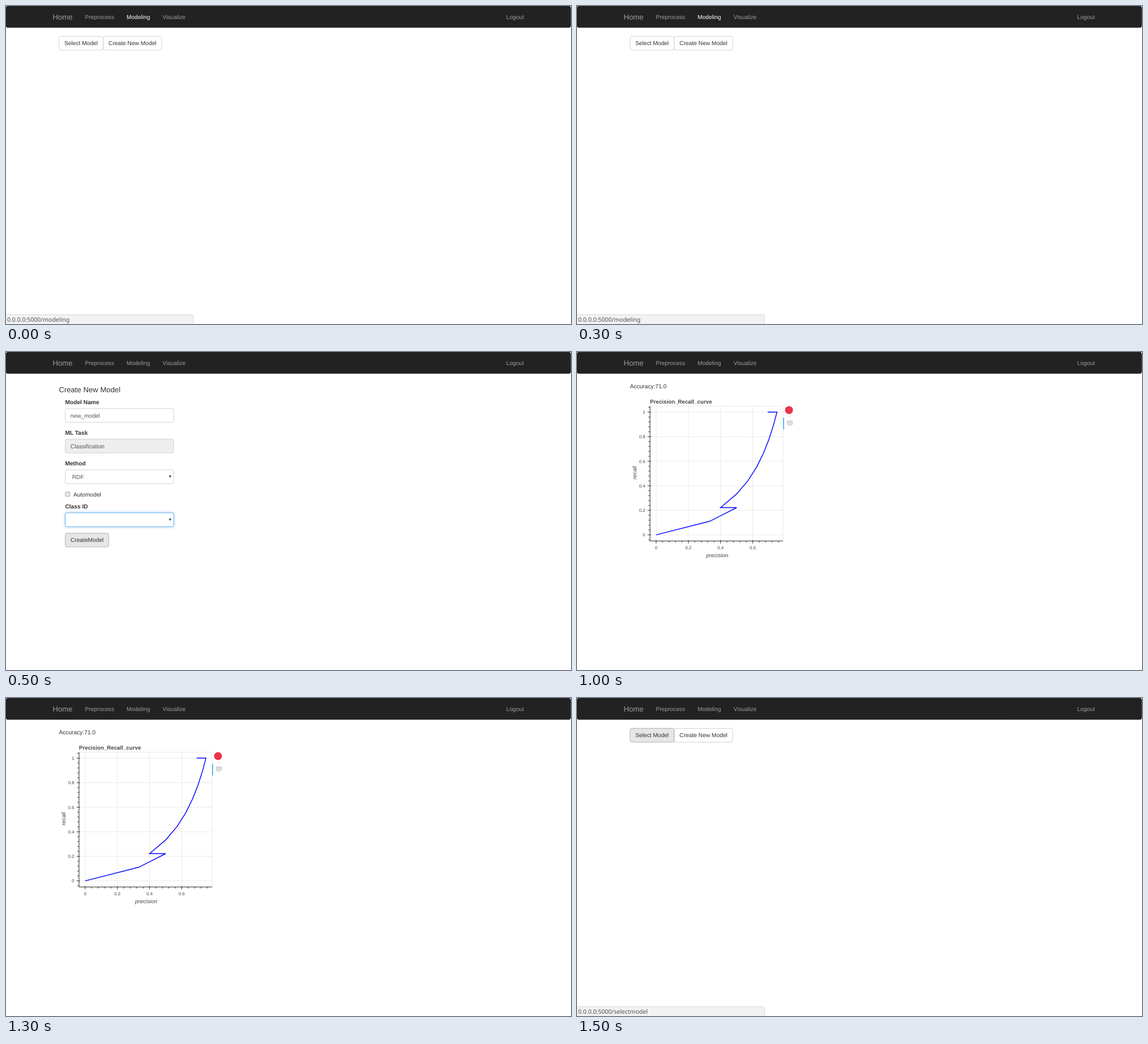
These frames come from a looping animation (998 by 561 pixels, 2 s). An HTML page:

```html
<!DOCTYPE html>
<html lang="en">
<head>
<meta charset="utf-8">
<title>Model builder</title>
<style>
  html, body { margin: 0; width: 100%; height: 100%; overflow: hidden; background: #fff; }
  svg { display: block; width: 998px; height: 561px; }
  text { font: 10.23px "Liberation Sans", Arial, sans-serif; fill: #333; text-rendering: geometricPrecision; }
  .large { font-size: 13.15px; }
  .bold { font-weight: bold; }
  .nav { fill: #9d9d9d; }
  .active { fill: #fff; }
  .value { fill: #555; }
  .status { font: 10.5px "Noto Sans", sans-serif; fill: #505050; }
  .title { font-size: 9.74px; font-weight: bold; fill: #444; }
  .axis { font-size: 9.74px; font-style: italic; fill: #444; text-anchor: middle; }
  .tick { font-size: 7.8px; fill: #444; text-anchor: middle; }
  .end { text-anchor: end; }
  .focus { filter: drop-shadow(0 0 2.5px rgba(102, 175, 233, .7)); }
</style>
</head>
<body>
<svg id="stage" viewBox="0 0 998 561"></svg>
<script>
const stage = document.getElementById('stage');

const text = (x, y, label, cls = '', extra = '') =>
  `<text x="${x}" y="${y}" class="${cls}" ${extra}>${label}</text>`;
const box = (x, y, w, h, fill = '#fff', stroke = '#ccc', radius = 2.9, cls = '') =>
  `<rect x="${x}" y="${y}" width="${w}" height="${h}" rx="${radius}" fill="${fill}" stroke="${stroke}" stroke-width=".9" class="${cls}"/>`;
const path = (d, stroke, width = .8, fill = 'none') =>
  `<path d="${d}" stroke="${stroke}" stroke-width="${width}" fill="${fill}"/>`;

const button = (x, y, w, label, pressed) =>
  box(x, y, w, 24.3, pressed ? '#e6e6e6' : '#fff', pressed ? '#adadad' : '#ccc') +
  text(x + 9.2, y + 15.8, label);
const field = (y, fill, stroke, cls) => box(104.7, y, 191.4, 24.3, fill, stroke, 2.9, cls);
const arrow = y => path(`M287.6 ${y}h4.6l-2.3 4.3z`, 'none', 0, '#444');

function navbar(modelingActive) {
  const items = [[139.4, 'Preprocess'], [212.9, 'Modeling'], [276.5, 'Visualize'], [883.5, 'Logout']];
  return box(.4, .4, 996.8, 37.4, '#222', '#080808') + text(82.4, 23.5, 'Home', 'nav large') +
    items.map(([x, label]) =>
      text(x, 22.7, label, modelingActive && label === 'Modeling' ? 'active' : 'nav')).join('');
}

const menu = (address, selectPressed) =>
  navbar(!selectPressed) +
  button(171.8, 53.6, 103.2, 'Create New Model') +
  button(93.8, 53.6, 77.7, 'Select Model', selectPressed) +
  box(-4, 544.5, 335.3, 24, '#f2f2f2', '#d6d6d6') +
  text(2, 556.5, address, 'status');

const form = () =>
  navbar() +
  text(93.4, 70.9, 'Create New Model', 'large') +
  text(104.4, 92, 'Model Name', 'bold') + field(99.8) + text(113.8, 115.5, 'new_model', 'value') +
  text(104.4, 146, 'ML Task', 'bold') + field(153.8, '#eee') + text(113.8, 169.6, 'Classification', 'value') +
  text(104.4, 200.1, 'Method', 'bold') + field(207.9) + text(116.7, 223.6, 'RDF', 'value') + arrow(217.8) +
  box(104.9, 246.8, 8, 8, '#e6e6e6', '#a3a3a3', 1.5) + text(119, 254.5, 'Automodel') +
  text(104.4, 276.1, 'Class ID', 'bold') + field(283.8, '#fff', '#66afe9', 'focus') + arrow(293.8) +
  button(104.7, 319.6, 76.8, 'CreateModel', true);

function chart() {
  const left = 129, right = 364, top = 95.6, bottom = 333.4;
  const px = v => +(139.8 + 284.5 * v).toFixed(2);
  const py = v => +(322.6 - 216.5 * v).toFixed(2);
  let grid = '', ticks = '', labels = '';

  // Minor ticks every 0.04, a major tick with a label every 0.2.
  for (let i = -1; i <= 26; i++) {
    const v = i / 25, x = px(v), y = py(v), major = i % 5 === 0;
    const out = major ? 4.4 : 2.9, inner = major ? 1.5 : 0;
    if (x > left && x < right) {
      ticks += `M${x} ${bottom - inner}v${out + inner}`;
      if (major) {
        grid += `M${x} ${top}V${bottom}`;
        labels += text(x, 347.6, v, 'tick');
      }
    }
    ticks += `M${left + inner} ${y}h${-out - inner}`;
    if (major) {
      grid += `M${left} ${y}H${right}`;
      labels += text(120.6, y + 2.8, v, 'tick end');
    }
  }

  // Each entry is [true positives, predicted positives] out of nine positives.
  const counts = [[0, 1], [1, 3], [2, 4], [2, 5]];
  for (let hits = 3; hits <= 9; hits++) counts.push([hits, hits + 3]);
  counts.push([9, 13]);
  const curve = 'M' + counts.map(([hits, n]) => `${px(hits / n)} ${py(hits / 9)}`).join('L');

  return navbar() + text(93.4, 63.6, 'Accuracy:71.0') +
    text(left, 90.8, 'Precision_Recall_curve', 'title') +
    path(grid + `M${left} ${top}H${right}V${bottom}H${left}z`, '#e5e5e5') +
    path(`M${left} ${top}V${bottom}H${right}` + ticks, '#000') + labels +
    path(curve, '#00f', 1.46) +
    text(247.6, 361.6, 'precision', 'axis') +
    text(0, 0, 'recall', 'axis', 'transform="translate(104.8 213) rotate(-90)"') +
    '<circle cx="374.5" cy="102.5" r="7" fill="#e8344e"/>' +
    path('M371.5 113.5h8', '#ddd') +
    path('M364.9 116v20.4', '#26aae1', 1.5) +
    path('M371.8 121.8h8.4v6h-2l-2.2 2.8l-2.2 -2.8h-2z', '#a8a8a8', .9, '#f4f4f4') +
    path('M373.4 123.8h5.2M373.4 125.8h5.2', '#a8a8a8', .7);
}

const scenes = [
  menu('0.0.0.0:5000/modeling', false),
  form(),
  chart(),
  menu('0.0.0.0:5000/selectmodel', true)
];
let shown = -1;

function draw() {
  const index = Math.floor(performance.now() % 2000 / 500);
  if (index !== shown) stage.innerHTML = scenes[shown = index];
  requestAnimationFrame(draw);
}
draw();
</script>
</body>
</html>
```
